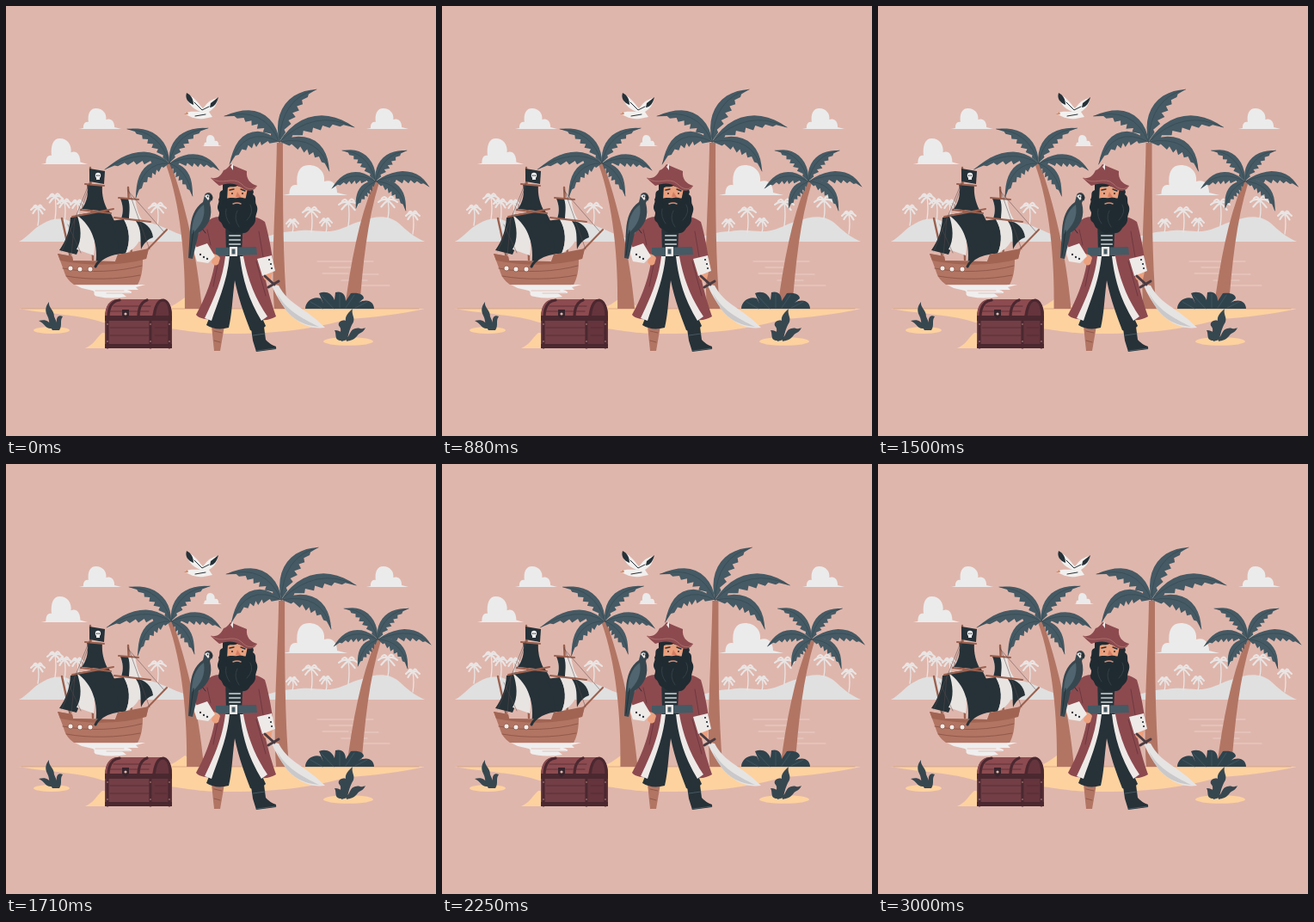
An HTML page that plays this animation: 500x500 px, repeating every 3.04 s.

```html
<!DOCTYPE html>
<html lang="en">
<head>
<meta charset="utf-8">
<title>Pirate island</title>
<style>
html, body { margin: 0; width: 100%; height: 100%; overflow: hidden; background: #dfb6ac; }
svg { display: block; width: 100vw; height: 100vh; }
.line { fill: none; stroke-linecap: round; stroke-linejoin: round; }
</style>
</head>
<body>
<svg viewBox="0 0 500 500">
  <rect width="500" height="500" fill="#dfb6ac"/>
  <g id="clouds" fill="#ebebeb"/>

  <g id="hills" fill="#e0e0e0">
    <path d="M15 274C25 269 31 259 43 253C55 246 67 246 78 252L108 262C124 250 138 247 151 249C174 251 187 260 204 266L226 274Z"/>
    <path d="M285 274C305 268 318 262 336 262C354 259 363 263 377 262C393 260 400 253 414 250C430 244 444 243 456 252C467 262 475 269 487 274Z"/>
  </g>
  <g id="farPalms"/>

  <path class="line" stroke="#ebd3cc" stroke-width=".8" d="M362 297H427M376 304H404M368 311H398M401 312H433M390 319H420M408 325H446"/>

  <g id="gull">
    <path d="M226 123C216 119 210 112 210 102C218 105 223 112 229 119Q237 108 246 107C246 115 241 120 236 123L240 129L230 131C222 132 215 130 208 125C213 122 219 123 226 123Z" fill="#f2f0ee"/>
    <path d="M218 115C211 112 208 107 210 101C216 104 218 109 218 115ZM238 113L247 106C245 113 243 117 237 118Z" fill="#263238"/>
    <path class="line" d="M219 112L228 121L236 117M220 128L232 126" stroke="#263238" stroke-width="1"/>
    <path d="M211 123L207 126L212 126Z" fill="#d38b63"/>
  </g>

  <g id="ship">
    <path d="M80 324H162L151 327L154 330H141C150 333 147 335 135 334L140 338Q121 341 108 338C99 337 105 333 101 331L88 328Z" fill="#f0eeee"/>
    <path class="line" d="M68 324H150M104 331H137M117 334H144" stroke="#dfb6ac" stroke-width=".8"/>
    <path class="line" d="M98 188L101 295M142 211L146 292M65 247L75 293" stroke="#9c614f" stroke-width="2.4"/>
    <path d="M97 189L115 192L114 207L97 204Z" fill="#263238"/>
    <circle cx="107" cy="197" r="3.2" fill="#eee"/><path d="M105 199H109V202H105Z" fill="#eee"/>
    <path d="M105.2 196.5h1.2v1.4h-1.2zM107.6 196.5h1.2v1.4h-1.2z" fill="#263238"/>
    <path d="M94 207L112 208C111 220 114 230 119 239L88 236C95 227 96 217 94 207Z" fill="#263238"/>
    <path d="M133 224L150 224C152 235 153 241 158 248L134 247C137 239 136 231 133 224Z" fill="#e8e4e2"/>
    <path d="M133 224L142 224C145 234 143 241 143 248L134 247C137 239 136 231 133 224Z" fill="#263238"/>
    <path d="M75 246L84 244C89 260 89 275 82 289L62 284C70 273 74 261 75 246Z" fill="#263238"/>
    <path d="M83 244C98 250 106 271 102 290L82 283C89 271 87 257 83 244Z" fill="#e8e4e2"/>
    <path d="M82 243L119 237C127 249 132 263 131 279L131 287C121 288 111 294 104 303C108 279 101 256 82 243Z" fill="#263238"/>
    <path d="M121 250L137 248C144 259 145 275 139 288L130 288C132 274 128 261 121 250Z" fill="#263238"/>
    <path d="M137 248L151 250C159 262 158 273 148 282L139 288C145 274 144 261 137 248Z" fill="#e8e4e2"/>
    <path d="M151 250C162 250 170 259 171 269C165 271 160 276 157 283C156 269 158 260 151 250Z" fill="#263238"/>
    <path class="line" d="M87 237L122 241M92 207L114 209M77 245L125 236M126 246L168 251M131 223L154 225M158 290L187 260" stroke="#9c614f" stroke-width="2"/>
    <path class="line" d="M98 203L65 285M98 206L87 238M142 213L167 283M142 215L184 263M80 247L76 290M72 254L87 287" stroke="#58494a" stroke-width=".5"/>
    <path d="M60 288L77 291L78 296L127 297L130 289L158 285L166 282L163 294L159 294C159 308 157 317 153 324H79C72 319 69 314 67 307Z" fill="#b27564"/>
    <path d="M60 288L77 291L78 296L127 297L130 289L166 282L163 294C136 302 96 303 63 296Z" fill="#a16453"/>
    <path class="line" d="M66 305C96 311 132 309 158 302M70 314C97 319 130 318 156 313" stroke="#8e5647" stroke-width=".9"/>
    <path class="line" d="M104 303C108 295 117 289 131 287" stroke="#263238" stroke-width="3"/>
    <g fill="#f3ece8" stroke="#8e5647" stroke-width=".8"><circle cx="75" cy="305" r="3"/><circle cx="86" cy="306" r="3"/><circle cx="98" cy="306" r="3"/></g>
  </g>

  <g id="sand" fill="#fdd29f">
    <path d="M15 352H187Q199 346 208 339L232 352H487C459 358 430 362 397 364C360 375 318 381 262 381C221 382 203 375 178 374L113 368C89 359 46 358 15 352Z"/>
    <path d="M92 398C102 394 105 386 112 380C121 379 126 391 153 398Z"/>
    <ellipse cx="53" cy="377" rx="21" ry="4"/>
    <ellipse cx="398" cy="390" rx="29" ry="4.8"/>
    <path class="line" d="M18 352H480" stroke="#c89472" stroke-width=".6"/>
  </g>

  <g id="palms"/>

  <path d="M348 352C348 343 358 337 366 340L369 346L364 334C372 331 379 334 382 342L383 333C390 331 395 335 395 343L401 334C411 333 416 336 416 340L410 345C421 339 428 345 428 352Z" fill="#2f434d"/>
  <path class="line" d="M354 344L368 352M367 337L381 352M388 335V351M405 336L395 351M420 344L406 351" stroke="#455a64" stroke-width=".8"/>

  <g id="plants" fill="#37474f">
    <path d="M54 377C49 370 51 365 48 360C45 354 46 349 50 344C49 351 56 353 56 361L59 368C58 361 62 359 66 361C62 366 66 371 62 377ZM53 375C46 376 45 369 38 366C46 364 50 366 53 372Z"/>
    <path d="M390 390C387 380 391 377 388 373C384 369 390 364 395 366C394 360 399 356 403 352C401 360 408 363 402 371C399 378 398 382 397 388ZM396 387C400 383 400 376 406 375C411 373 413 377 418 374C415 381 411 379 408 384C405 388 400 389 396 390ZM390 389C381 389 385 382 382 377C391 377 393 382 393 389Z"/>
  </g>

  <g id="chest">
    <path d="M115 362C115 348 121 341 130 341H181C189 342 193 350 193 360V398H115Z" fill="#733e46"/>
    <path d="M115 361C116 348 122 341 130 341H181Q174 347 170 361Z" fill="#8c4b50"/>
    <path d="M170 361C172 348 176 341 182 341Q193 343 193 361V398H170Z" fill="#65343c"/>
    <path d="M115 360H193V366H115ZM115 393H193V398H115Z" fill="#4b2830"/>
    <path class="line" d="M119 362C119 349 124 343 132 342M154 362C154 351 158 344 164 342M172 364C173 350 177 342 183 342C189 343 191 352 191 362M118 366V397M168 366V397M190 366V397" stroke="#4b2830" stroke-width="3.2"/>
    <path class="line" d="M121 374H166M121 383H166M173 374H187M173 383H187M125 349H168M120 355H166" stroke="#512b33" stroke-width=".8"/>
    <path d="M135 353H143V360L139 364L135 360Z" fill="#38252d"/><circle cx="139" cy="358" r="1.6" fill="#dfb6ac"/>
    <path class="line" d="M118 370h0M118 390h0M168 370h0M168 390h0M190 370h0M190 390h0" stroke="#d8aaa1" stroke-width="1.3"/>
  </g>

  <g id="pirate">
    <path d="M239 372H254L249 401H242Z" fill="#b27564"/>
    <path class="line" d="M242 378L251 380M242 389L249 391" stroke="#8e5647" stroke-width=".9"/>
    <path d="M285 375L300 373L302 388Q306 393 314 396V399L291 402L287 389Z" fill="#263238"/>
    <path class="line" d="M287 383L301 381M291 401L314 398" stroke="#50636b" stroke-width=".8"/>
    <path d="M236 249C246 242 256 246 266 245C279 243 292 244 301 251C305 264 308 281 310 294L297 298C302 319 306 339 314 361Q306 366 296 365L266 303L239 365C233 364 225 364 221 359C232 339 241 316 244 291L229 286C219 282 219 275 222 267Z" fill="#8c4a4f"/>
    <path d="M255 246H276L274 288H256Z" fill="#263238"/>
    <path d="M256 290H275C281 320 291 349 302 372Q294 381 284 377C276 356 270 339 266 319C263 341 263 357 259 374Q244 378 233 371C243 348 251 318 256 290Z" fill="#263238"/>
    <path d="M255 291H260C257 322 245 347 239 366L231 363C243 338 252 317 255 291ZM272 291H276C281 319 291 342 304 361L297 366C282 341 275 318 272 291Z" fill="#eee9e7"/>
    <path class="line" d="M234 260L238 278M294 262L299 292M247 296L241 326M291 297L302 337" stroke="#6e393f" stroke-width="1"/>
    <path class="line" d="M260 267H272M260 272H272M260 277H272" stroke="#a5afb3" stroke-width="2.2"/>
    <path d="M244 281L291 280L292 289L244 291Z" fill="#455a64"/>
    <rect x="260" y="280" width="9" height="11" fill="#eee9e7"/><rect x="262.5" y="282.5" width="4" height="6" fill="#455a64"/>
    <path d="M241 288Q247 289 249 293L247 300Q243 304 239 298Z" fill="#eba07e"/>
    <path d="M217 282L234 276L243 291L235 299L222 297Z" fill="#eeeae8"/>
    <path class="line" d="M226 289h0M230 292h0M234 294h0" stroke="#263238" stroke-width="2.3"/>
    <path d="M299 310L310 309L308 318Q301 322 299 315Z" fill="#eba07e"/>
    <path d="M292 294L309 290L313 308L298 314Z" fill="#eeeae8"/>
    <path class="line" d="M306 295h0M308 300h0M309 305h0" stroke="#263238" stroke-width="2.2"/>
    <path d="M308 323L317 325C329 348 349 351 371 374C348 377 326 364 308 323Z" fill="#e6e3e3"/>
    <path d="M315 334C326 354 344 363 364 373C341 371 325 360 315 334Z" fill="#c9c8ca"/>
    <path class="line" d="M301 314L312 324M305 327L317 320" stroke="#4a3b42" stroke-width="3"/>

    <path d="M252 206Q267 198 285 207C284 213 290 214 287 219C292 222 289 227 291 231C294 237 291 240 290 246C291 254 285 256 283 260C278 267 272 263 267 264C261 265 260 261 256 259C251 258 253 253 248 250C245 245 250 242 247 238C244 232 249 229 247 225C250 221 246 216 252 214Z" fill="#202b31"/>
    <path d="M258 209C266 205 276 207 281 212L278 227C272 231 262 231 257 226Z" fill="#eba07e"/>
    <path d="M256 224C262 222 265 224 269 223C274 221 277 225 281 223L279 239H257Z" fill="#202b31"/>
    <path class="line" d="M264 230Q269 228 273 230" stroke="#d98b72" stroke-width="1.5"/>
    <path class="line" d="M263 218h0M275 218h0" stroke="#263238" stroke-width="2"/>
    <path class="line" d="M260 214L265 213M273 213L278 215" stroke="#263238" stroke-width="1.4"/>
    <path d="M269 216L273 222L267 222Z" fill="#d67d63"/>
    <path d="M252 208C260 202 276 205 284 211L280 214C275 209 274 212 269 209C264 212 260 208 256 213Z" fill="#202b31"/>
    <path d="M238 200C247 201 250 197 253 191Q257 190 261 184Q270 188 280 192C279 201 284 207 292 209C287 218 278 215 272 210C263 204 254 207 248 209Q243 205 238 200Z" fill="#8c4a4f"/>
    <path class="line" d="M239 200C251 210 263 197 274 207C280 214 287 214 291 210" stroke="#ac6e69" stroke-width="1"/>
    <path d="M261 187L264 183L264 191Z" fill="#eee9e7"/>
    <path class="line" d="M256 236Q254 245 260 253M284 231Q289 240 280 249M269 238Q264 247 271 257" stroke="#38464c" stroke-width=".8"/>
  </g>

  <g id="parrot">
    <path d="M231 220C233 215 240 217 240 222L237 229C241 244 236 256 224 264L217 294L212 293L214 261C215 246 219 235 229 228Z" fill="#37474f"/>
    <path d="M230 231C232 244 228 255 216 265C216 249 221 237 230 231Z" fill="#50656f"/>
    <path d="M231 221Q235 217 238 222L235 226Z" fill="#eee9e7"/><path d="M237 219Q243 221 239 227L236 223Z" fill="#263238"/>
    <circle cx="234.5" cy="221.5" r=".9" fill="#263238"/>
    <path class="line" d="M218 261L214 290M229 260L232 264" stroke="#263238" stroke-width="1"/>
  </g>
</svg>
<script>
const NS = 'http://www.w3.org/2000/svg';
const byId = id => document.getElementById(id);

function addPath(parent, d, attrs = {}) {
  const el = document.createElementNS(NS, 'path');
  el.setAttribute('d', d);
  for (const key in attrs) el.setAttribute(key, attrs[key]);
  parent.append(el);
}

function cloud(x, y, width, height) {
  addPath(byId('clouds'),
    'M0 24L5 23C5 18 7 15 11 16C10 6 13 0 20 0C28 0 33 6 32 13C38 11 42 15 42 22L50 24Z',
    { transform: `translate(${x} ${y}) scale(${width / 50} ${height / 24})` });
}

function farPalm(x, y, height, size) {
  const attrs = { class: 'line', stroke: '#e9e5e4', transform: `translate(${x} ${y})` };
  addPath(byId('farPalms'), `M0 0Q2 ${height / 2} 0 ${height}`, { ...attrs, 'stroke-width': 1.3 });
  const fronds = [[-1, 0], [-.7, .5], [-.65, -.35], [.6, -.4], [1, 0], [.7, .55]];
  for (const [dx, dy] of fronds) {
    addPath(byId('farPalms'), `M0 0Q${dx * size * .5} ${dy * size - 3} ${dx * size} ${dy * size + 2}`,
      { ...attrs, 'stroke-width': 2.1 });
  }
}

// A frond follows a quadratic spine; its inner edge is cut into teeth.
function frond(parent, [x0, y0], [cx, cy, x1, y1], width) {
  const side = Math.sign(x1 - x0);
  const at = (t, offset) => {
    const u = 1 - t;
    const dx = u * (cx - x0) + t * (x1 - cx);
    const dy = u * (cy - y0) + t * (y1 - cy);
    const k = side * offset * width * Math.sin(Math.PI * t ** .85) / Math.hypot(dx, dy);
    const x = u * u * x0 + 2 * u * t * cx + t * t * x1 - dy * k;
    const y = u * u * y0 + 2 * u * t * cy + t * t * y1 + dx * k;
    return `${x.toFixed(1)} ${y.toFixed(1)}`;
  };
  const points = [];
  for (let i = 0; i <= 12; i++) points.push(at(i / 12, -.45));
  for (let i = 6; i >= 0; i--) {
    points.push(at((i + .85) / 7, .9), at((i + .1) / 7, .5));
  }
  addPath(parent, `M${points.join('L')}Z`, { fill: '#455a64' });
  addPath(parent, `M${x0} ${y0}Q${cx} ${cy} ${x1} ${y1}`,
    { class: 'line', stroke: '#334750', 'stroke-width': .6 });
}

function palm(trunk, crown, width, fronds) {
  const parent = byId('palms');
  addPath(parent, trunk, { fill: '#b27564' });
  fronds.forEach(f => frond(parent, crown, f, width));
}

cloud(85, 119, 49, 24);
cloud(41, 154, 54, 30);
cloud(228, 150, 23, 13);
cloud(322, 185, 75, 35);
cloud(419, 119, 49, 24);

[[37, 235, 20, 8], [57, 222, 26, 9], [68, 228, 22, 8], [83, 229, 25, 8], [176, 233, 22, 10],
 [333, 251, 12, 7], [355, 238, 25, 10], [372, 250, 13, 7], [398, 229, 27, 11],
 [444, 226, 21, 11], [473, 242, 23, 8]].forEach(p => farPalm(...p));

palm('M186 184H192C208 231 222 286 228 352H208C209 294 203 231 186 184Z', [190, 183], 11, [
  [179, 145, 141, 143], [197, 146, 235, 142], [156, 163, 115, 190],
  [158, 181, 151, 223], [226, 168, 248, 191], [211, 190, 217, 221]]);
palm('M315 159H322C322 229 322 295 327 352H312C308 294 314 228 315 159Z', [318, 158], 13.5, [
  [300, 116, 254, 128], [320, 107, 361, 97], [277, 137, 260, 184],
  [359, 118, 405, 141], [366, 149, 376, 192]]);
palm('M428 205H434C420 250 415 301 411 352H394C401 299 410 249 428 205Z', [430, 204], 10.5, [
  [421, 169, 391, 168], [436, 173, 466, 168], [400, 188, 379, 212],
  [472, 187, 492, 210], [460, 205, 465, 238], [411, 211, 407, 235]]);

// Sideways shake: one offset per tenth of the sway.
const OFFSETS = [0, -1, 2, -4, 4, -4, 4, -4, 2, -1, 0];
const LOOP = 3040, SWAY = 3000, FRAME = 1000 / 24;

function render(ms) {
  const step = Math.floor((ms % LOOP + 5) / FRAME);
  const pos = Math.min((step + .5) * FRAME / SWAY, 1) * 10;
  const i = Math.min(Math.floor(pos), 9);
  const x = OFFSETS[i] + (OFFSETS[i + 1] - OFFSETS[i]) * (pos - i);
  byId('palms').setAttribute('transform', `translate(${x.toFixed(3)} 0)`);
}

const start = performance.now();
function tick() {
  render(performance.now() - start);
  requestAnimationFrame(tick);
}
tick();
</script>
</body>
</html>
```
